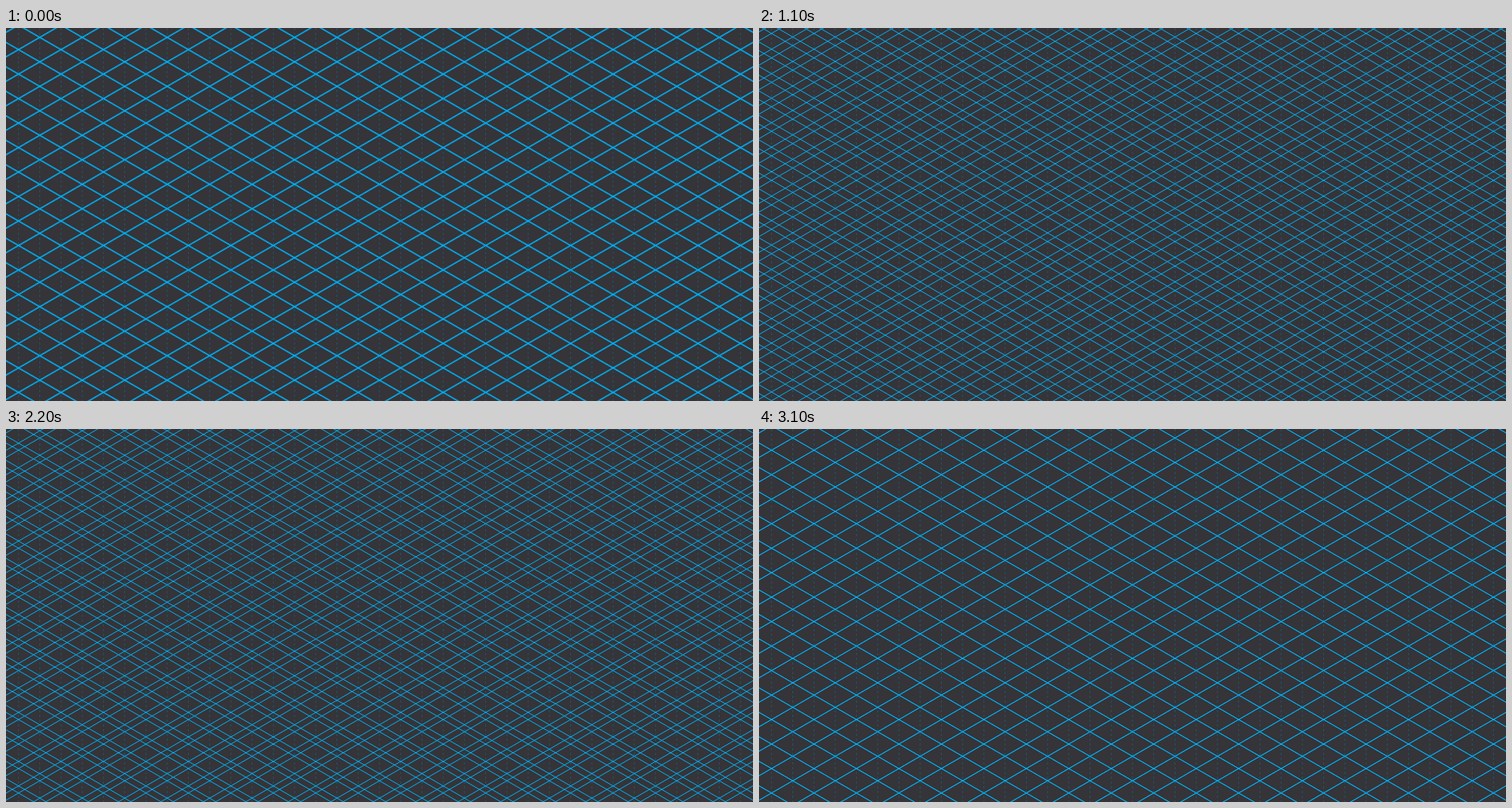
Write an HTML page with a canvas that moves like this. It is 940 px wide and 470 px high and loops after 3.3 s.

```html
<!DOCTYPE html>
<html lang="en">
<head>
<meta charset="utf-8">
<title>Isometric grid</title>
<style>
  html, body { margin: 0; width: 100%; height: 100%; overflow: hidden; background: #353438; }
  canvas { display: block; }
</style>
</head>
<body>
<canvas id="stage" width="940" height="470"></canvas>
<script>
const W = 940, H = 470;
const COL = 26.72;                 // distance between columns
const SLOPE = Math.tan(Math.PI / 6);
const ROW = 2 * COL * SLOPE;       // vertical period of the lattice
const LOOP = 3300, TICK = 100, STEPS = 31;

const ctx = document.getElementById('stage').getContext('2d');

// One full lattice of rhombi, moved down by dy
function lattice(dy) {
  const rise = SLOPE * W / 2;
  ctx.beginPath();
  for (let k = -10; k <= 25; k++) {
    const y = H / 2 - ROW / 4 + (k - 7) * ROW + dy;
    ctx.moveTo(0, y - rise);
    ctx.lineTo(W, y + rise);
    ctx.moveTo(0, y + rise);
    ctx.lineTo(W, y - rise);
  }
  ctx.stroke();
}

function columns() {
  ctx.beginPath();
  for (let k = -17; k <= 17; k++) {
    const x = W / 2 + k * COL;
    ctx.moveTo(x, 0);
    ctx.lineTo(x, H);
  }
  ctx.stroke();
}

function draw(step) {
  ctx.fillStyle = '#353438';
  ctx.fillRect(0, 0, W, H);

  ctx.lineWidth = 0.7;
  ctx.strokeStyle = 'rgba(0, 125, 180, 0.65)';
  ctx.setLineDash([3, 3]);
  columns();

  ctx.lineWidth = 1;
  ctx.strokeStyle = '#00b0f6';
  ctx.setLineDash([]);
  lattice(0);
  lattice(step / STEPS * ROW);
}

let shown = 0;
function frame() {
  // The first and last positions are held for two ticks
  const tick = Math.floor(performance.now() % LOOP / TICK);
  const step = Math.min(Math.max(tick, 1), STEPS);
  if (step !== shown) draw(shown = step);
  requestAnimationFrame(frame);
}
frame();
</script>
</body>
</html>
```
